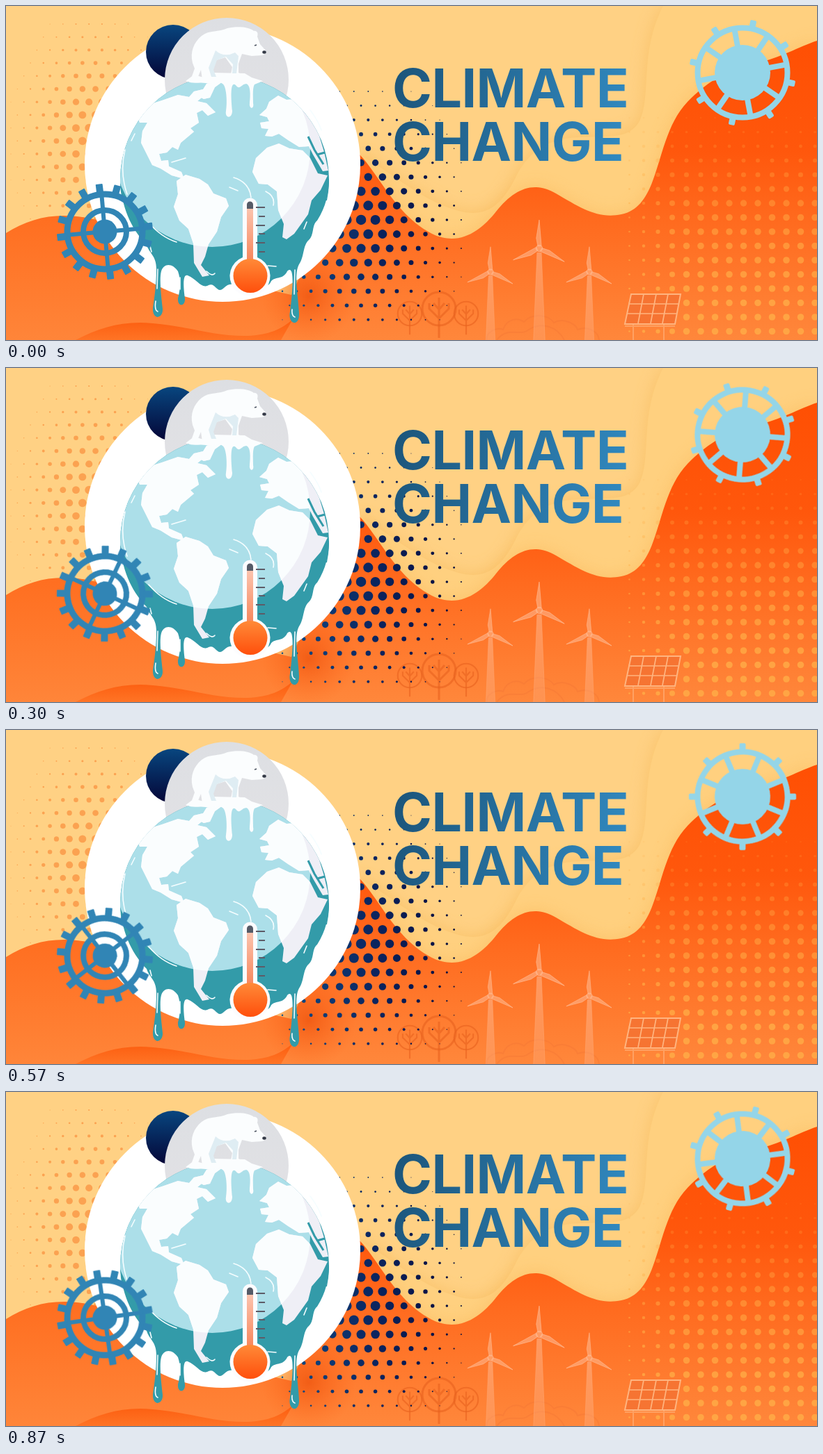
These frames come from a looping animation (1165x481 px, 0.9 s). An HTML page:

```html
<!DOCTYPE html>
<html lang="en">
<head>
<meta charset="utf-8">
<title>Climate Change</title>
<style>
  html, body { margin: 0; width: 100%; height: 100%; overflow: hidden; background: #ffd184; }
  svg { display: block; width: 100%; height: 100%; }
  .title { font: 700 77px Inter, Arial, sans-serif; letter-spacing: -.5px; fill: url(#titleBlue); }
  .spin { animation: spin .9s steps(30, end) infinite; }
  .spin.back { animation-direction: normal; animation-name: unspin; }
  @keyframes spin { to { transform: rotate(90deg); } }
  @keyframes unspin { to { transform: rotate(-90deg); } }
</style>
</head>
<body>
<svg viewBox="0 0 1165 481" preserveAspectRatio="none">
  <defs>
    <linearGradient id="titleBlue" gradientUnits="userSpaceOnUse" x1="560" y1="120" x2="890" y2="190">
      <stop offset="0" stop-color="#1c567c"/><stop offset="1" stop-color="#3189c0"/>
    </linearGradient>
    <linearGradient id="orange" gradientUnits="userSpaceOnUse" x1="0" y1="60" x2="0" y2="481">
      <stop offset="0" stop-color="#ff5004"/><stop offset=".35" stop-color="#ff570c"/>
      <stop offset=".6" stop-color="#ff6b1f"/><stop offset="1" stop-color="#ff873b"/>
    </linearGradient>
    <linearGradient id="leftOrange" x1="0" y1="0" x2="0" y2="1">
      <stop offset="0" stop-color="#ff6e20"/><stop offset="1" stop-color="#ff8539"/>
    </linearGradient>
    <linearGradient id="lowOrange" x1="0" y1="0" x2="0" y2="1">
      <stop offset="0" stop-color="#fc5d0f"/><stop offset="1" stop-color="#ff7425"/>
    </linearGradient>
    <linearGradient id="navy" x1="0" y1="0" x2="0" y2="1">
      <stop offset="0" stop-color="#08467f"/><stop offset="1" stop-color="#040536"/>
    </linearGradient>
    <linearGradient id="grey" x1="0" y1="0" x2="0" y2="1">
      <stop offset="0" stop-color="#dddfe3"/><stop offset="1" stop-color="#e3e2e5"/>
    </linearGradient>
    <linearGradient id="mercury" x1="0" y1="0" x2="0" y2="1">
      <stop offset="0" stop-color="#fbc5b0"/><stop offset="1" stop-color="#f78357"/>
    </linearGradient>
    <linearGradient id="bulb" x1="0" y1="0" x2="0" y2="1">
      <stop offset="0" stop-color="#ff8a38"/><stop offset="1" stop-color="#ff4f0c"/>
    </linearGradient>
    <linearGradient id="tower" x1="0" y1="0" x2="0" y2="1">
      <stop offset="0" stop-color="#ffae80" stop-opacity=".65"/><stop offset="1" stop-color="#ffae80" stop-opacity=".3"/>
    </linearGradient>
    <radialGradient id="shade">
      <stop offset="0" stop-color="#e94905" stop-opacity=".6"/><stop offset="1" stop-color="#ff6014" stop-opacity="0"/>
    </radialGradient>
    <filter id="soft" x="-20%" y="-20%" width="140%" height="140%"><feGaussianBlur stdDeviation="13"/></filter>
    <clipPath id="lit"><circle cx="296" cy="206" r="141"/></clipPath>
    <clipPath id="sphere"><circle cx="314" cy="250" r="150"/></clipPath>
    <path id="gold" d="M505 213C550 235 590 278 650 295C690 306 712 286 731 249C749 211 777 190 825 189C868 187 895 192 910 166C928 128 909 68 944 0H1165V481H505Z"/>
    <path id="wave" d="M380 481L505 211C535 240 558 300 612 328C651 347 682 324 704 296C730 263 758 251 790 270C826 291 850 307 884 300C943 288 930 189 979 138C1012 104 1042 90 1078 82C1110 76 1140 58 1165 50V481Z"/>
    <g id="turbine">
      <path d="M-3 6H3L8 130H-8Z" fill="url(#tower)" stroke="#ffab79" stroke-opacity=".45"/>
      <g id="blades" fill="#ffb58b" fill-opacity=".6" stroke="#ffbd97" stroke-opacity=".7" stroke-width=".8">
        <path id="blade" d="M-2-3L-4-14L0-39L3-3Z"/>
        <use href="#blade" transform="rotate(118)"/><use href="#blade" transform="rotate(246)"/>
        <circle r="4.5"/>
      </g>
    </g>
    <g id="tree" fill="none" stroke="#e8631f" stroke-opacity=".62" stroke-width="3">
      <circle r="24"/>
      <path d="M0 42V-16M0 14L-14 0V-8M0 14L14 0V-8M0 1L-8-8M0 1L8-8"/>
    </g>
    <g id="land">
      <path d="M189 158L202 143L224 136L247 128L263 131L270 123L287 119L286 128L275 137L288 140L301 153L290 158L282 150L274 154L277 168L265 176L270 181L251 197L247 207L239 203L231 211L220 213L223 223L233 222L234 231L252 239L256 249L238 244L222 234L210 229L202 213L194 197L196 180L203 168L192 168Z"/>
      <path d="M245 252L258 243L278 249L290 257L298 270L316 277L320 288L309 304L303 325L291 343L286 361L280 373L292 388L282 390L270 370L269 342L262 321L249 309L241 289L247 271Z"/>
      <path d="M364 157L374 148L378 138L391 129L403 135L416 134L433 151L447 177L457 210L463 237L455 238L441 214L435 202L421 203L405 193L392 184L382 188L372 187L377 177L367 176L365 168L378 166L375 160Z"/>
      <path d="M354 239L359 219L375 204L392 198L407 205L426 208L437 219L448 241L462 244L452 265L439 280L434 300L414 328L403 336L397 333L399 314L391 294L389 267L376 257L363 256Z"/>
      <path d="M277 130L288 112L318 104L300 117L293 132L284 134Z"/>
    </g>
  </defs>

  <rect width="1165" height="481" fill="#ffd184"/>
  <g id="peachDots" fill="#fba251"/>
  <use href="#gold" fill="#f2b04c" opacity=".48" filter="url(#soft)"/>
  <use href="#gold" fill="#ffd07f"/>
  <use href="#wave" fill="#f4a238" opacity=".3" filter="url(#soft)"/>
  <use href="#wave" fill="url(#orange)"/>
  <g id="amberDots" fill="#ffad47"/>
  <path d="M0 327C37 304 75 296 126 307C190 319 270 390 430 420C420 450 395 481 360 481H0Z" fill="url(#leftOrange)"/>
  <ellipse cx="435" cy="418" rx="68" ry="68" fill="url(#shade)"/>
  <path d="M100 481C135 463 168 453 211 457C266 462 300 476 347 475C377 474 397 465 412 451L395 481Z" fill="url(#lowOrange)"/>

  <g fill="none" stroke="#ef7334" stroke-opacity=".35" stroke-width="2">
    <path d="M690 481C690 469 705 462 714 466C720 449 736 449 744 455C756 441 780 445 787 456C800 448 819 458 821 466C838 460 851 470 852 481"/>
    <path d="M705 481C721 460 739 477 751 466C770 454 792 462 802 481"/>
  </g>
  <use href="#tree" transform="translate(622 436)"/>
  <use href="#tree" transform="translate(580 443) scale(.72)"/>
  <use href="#tree" transform="translate(661 443) scale(.72)"/>
  <use href="#turbine" transform="translate(766 349) scale(1.05)"/>
  <use href="#turbine" transform="translate(696 383) scale(.93)"/>
  <use href="#turbine" transform="translate(838 383) scale(.93)"/>
  <g fill="#ff9b58" stroke="#ffb47f" stroke-width="2">
    <path d="M898 415H969L961 458H889Z" fill="#f67432"/>
    <path d="M895 429H966M892 443H963M916 415L908 457M934 415L926 457M951 415L943 457" fill="none" stroke-width="1.7"/>
    <path d="M901 459V481M945 459V481M889 461H961" fill="none" stroke-opacity=".6"/>
  </g>

  <g id="blueDots"/>
  <circle cx="311" cy="228" r="198" fill="#fff"/>
  <circle cx="240" cy="66" r="39" fill="url(#navy)"/>
  <circle cx="317" cy="106" r="89" fill="url(#grey)"/>

  <!-- melting globe -->
  <g fill="#339ba9">
    <path d="M164 250C166 296 184 325 202 344C206 357 216 359 216 379C216 402 213 421 211 435C210 453 226 451 225 436C223 418 220 393 223 382C227 369 240 371 247 382C252 397 250 409 247 421C246 434 258 433 257 421C255 407 253 385 261 388C275 394 281 408 291 402C301 397 303 416 313 406C324 395 331 405 346 402C362 399 374 409 380 398C385 388 397 396 404 382C415 371 412 409 408 440C404 459 422 463 421 443C420 419 413 386 421 372C429 360 426 345 435 337C443 330 439 315 447 309C461 287 464 265 464 250Z"/>
    <circle cx="314" cy="250" r="150" clip-path="inset(0 0 40% 0)"/>
  </g>
  <g clip-path="url(#sphere)">
    <circle cx="296" cy="206" r="141" fill="#acdfe9"/>
    <use href="#land" fill="#efeff6"/>
    <use href="#land" fill="#fafdfe" clip-path="url(#lit)"/>
    <path d="M434 188L443 207L456 228M447 214L458 211" fill="none" stroke="#339ba9" stroke-width="3"/>
  </g>
  <g fill="none" stroke="#f5fdff" stroke-width="1.6" stroke-linecap="round">
    <path d="M171 207Q163 239 174 271M177 282L181 292M185 184L180 194M205 312Q223 333 245 340M327 247Q350 254 352 276M373 267Q387 274 384 287M321 261L333 266M238 225L258 219M207 346L209 354M218 379L217 407M250 391V408M415 380L414 415M432 311L428 321M437 150Q449 166 453 179M376 374L388 375M215 425Q213 438 218 440M411 437Q410 446 415 448M288 382Q296 390 300 385"/>
  </g>

  <!-- ice and bear -->
  <path d="M258 108L270 99L284 103L298 96L343 97L353 103L369 108L357 113C354 118 355 128 355 140C357 149 349 149 350 140C351 130 352 114 345 112C337 113 336 122 330 114C322 107 323 131 325 151C325 163 314 162 316 151C318 140 317 115 311 112C304 106 298 114 287 111C276 109 271 113 258 108Z" fill="#fbfdfe"/>
  <path d="M268 82C264 66 270 52 281 43C292 34 306 38 318 32C332 29 349 30 356 36C360 35 363 39 361 44L365 55L373 64Q374 70 367 71L353 72L339 69L334 83L334 96L341 100V104H322L325 88L315 74L302 78L296 91L302 102V106H282L280 92L275 104H266L271 90Z" fill="#fbfdfe"/>
  <path d="M301 64Q313 75 329 67L334 72L331 97H325L326 84L316 73L303 78L298 92L302 102H295L291 89Z" fill="#dfedf3"/>
  <path d="M357 57L360 56" stroke="#4b5260" stroke-width="1.5"/>
  <ellipse cx="371" cy="66.5" rx="2.7" ry="2.2" fill="#343946"/>

  <!-- thermometer -->
  <path d="M340 287A10.5 10.5 0 0 1 361 287V362A29 29 0 1 1 340 362Z" fill="#fcfcfe"/>
  <rect x="346" y="290" width="9" height="81" fill="url(#mercury)"/>
  <path d="M346 292V286A4.5 4.5 0 0 1 355 286V292Z" fill="#555b67"/>
  <circle cx="351" cy="388.5" r="24.5" fill="url(#bulb)"/>
  <path d="M359 290H372M363 303H372M359 316H372M363 328H372M359 341H372M363 354H372" stroke="#5d5b67" stroke-width="1.8"/>

  <text class="title" x="555" y="146">CLIMATE</text>
  <text class="title" x="555" y="223">CHANGE</text>

  <g transform="translate(142 325)"><g class="spin" id="blueGear" fill="#3185b5" stroke="#3185b5"/></g>
  <g transform="translate(1058 96)"><g class="spin back" id="paleGear" fill="#94d5e8" stroke="#94d5e8"/></g>
</svg>
<script>
  const $ = id => document.getElementById(id);
  const circle = (x, y, r, attrs = '') => `<circle cx="${x}" cy="${y}" r="${r}" ${attrs}/>`;
  const ring = (r, width) => circle(0, 0, r, `fill="none" stroke-width="${width}"`);

  // Evenly spaced radial bars between two radii
  function bars(count, phase, inner, outer, width, round = 0) {
    return Array.from({ length: count }, (_, i) =>
      `<rect x="${-width / 2}" y="${-outer}" width="${width}" height="${outer - inner}" rx="${round}" stroke="none" transform="rotate(${phase + i * 360 / count})"/>`
    ).join('');
  }

  function halftone(id, { x0, x1, y0, y1, step, stagger, radius, paint = () => '' }) {
    let out = '';
    for (let y = y0, row = 0; y <= y1; y += step, row++) {
      for (let x = x0 + (stagger && row % 2 ? step / 2 : 0); x <= x1; x += step) {
        const r = radius(x, y);
        if (r > .45) out += circle(x, y, r.toFixed(2), paint(x, y));
      }
    }
    $(id).innerHTML = out;
  }

  halftone('peachDots', {
    x0: 7, x1: 205, y0: 26, y1: 365, step: 18.7, stagger: true,
    radius: (x, y) => 6 * Math.exp(-(((x - 122) / 75) ** 2) - ((y - 190) / 125) ** 2)
  });
  halftone('blueDots', {
    x0: 397, x1: 660, y0: 123, y1: 455, step: 20.55, stagger: true,
    radius: (x, y) => 7.3 * Math.exp(-(((x - 508) / 105) ** 2) - ((y - 307) / 128) ** 2),
    paint: (x, y) => `fill="hsl(${216 + (x - 480) / 10} 80% ${Math.max(13, 24 - (x - 480) / 15)}%)"`
  });
  halftone('amberDots', {
    x0: 875, x1: 1165, y0: 161, y1: 481, step: 20.5,
    radius: (x, y) => Math.min(4.8, (x - 865) / 23, (y - 115) / 36),
    paint: (x, y) => `opacity="${Math.min(.8, .12 + (y - 160) / 390).toFixed(2)}"`
  });

  $('blueGear').innerHTML = ring(54, 9) + ring(31, 8) + circle(0, 0, 17.5, 'stroke="none"') +
    bars(16, -7, 56, 69, 10, 1) + bars(4, -5, 15, 54, 6);
  $('paleGear').innerHTML = ring(64.5, 8) + circle(0, 0, 40, 'stroke="none"') +
    bars(8, 12, 65, 77, 9, 2) + bars(8, 34.5, 38, 64, 8);
</script>
</body>
</html>
```
